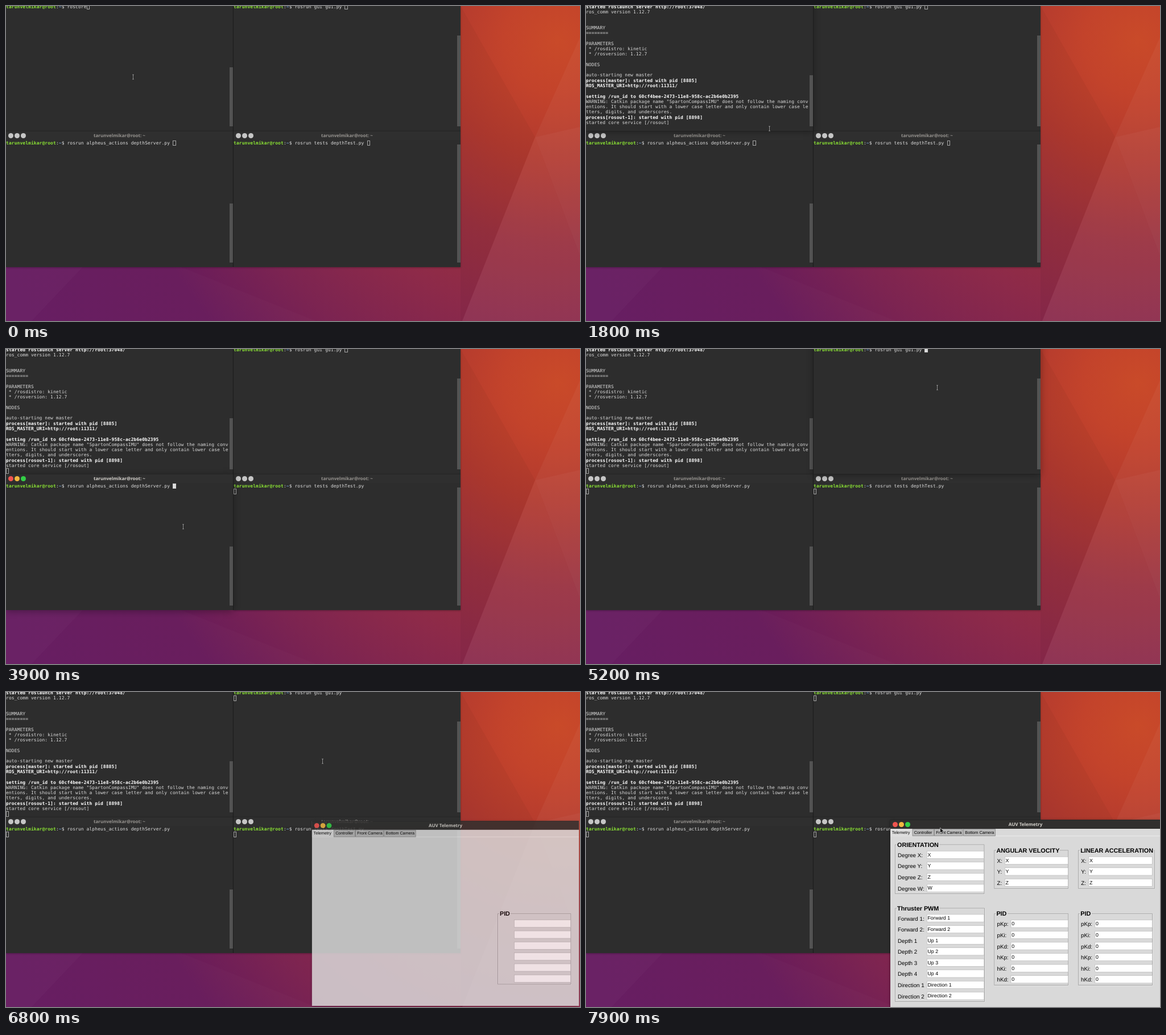
Write an HTML page that moves like this. It is 1009 px wide and 555 px high and loops after 8000 ms.

```html
<!DOCTYPE html>
<html lang="en">
<head>
<meta charset="utf-8">
<title>Terminals and telemetry</title>
<style>
  html, body { margin: 0; width: 100%; height: 100%; overflow: hidden; }
  body { position: relative; background: #6a1f5e; text-rendering: geometricPrecision; }
  svg { position: absolute; display: block; }
  #wall { left: 0; top: 0; }

  .win {
    position: absolute; width: 399px; height: 240px;
    background: #2d2d2d; box-shadow: 0 1px 3px rgba(0, 0, 0, .3);
  }
  .win.active { z-index: 2; box-shadow: 0 2px 12px rgba(0, 0, 0, .32); }
  .bar {
    position: absolute; left: 0; right: 0; top: 0; height: 16px;
    background: #2f2f2f; border-top: 1px solid #272727; box-sizing: border-box;
    text-align: center; color: #96938f; font: bold 8px/16px "Open Sans", sans-serif;
  }
  .active > .bar { color: #d6d3ce; }
  .dot { position: absolute; top: 3px; width: 9px; height: 9px; border-radius: 50%; background: #c6c6c6; }
  .dot:nth-of-type(1) { left: 4px; }
  .dot:nth-of-type(2) { left: 15px; }
  .dot:nth-of-type(3) { left: 26px; }
  .active .dot:nth-of-type(1) { background: #f0544f; }
  .active .dot:nth-of-type(2) { background: #f2b840; }
  .active .dot:nth-of-type(3) { background: #33cf46; }

  /* the tiny rotation keeps baselines from snapping to whole pixels */
  .rows {
    position: absolute; left: 0; top: 17px; margin: 0; color: #dcdcdc;
    font: 7.96px/9.27px "DejaVu Sans Mono", monospace; letter-spacing: .094px; white-space: pre;
    transform: rotate(.01deg); transform-origin: 0 0;
  }
  .rows b { color: #fff; }
  .rows .user { color: #8ae234; }
  .rows .dir { color: #729fcf; }
  .cursor {
    position: absolute; width: 5.4px; height: 9.4px; box-sizing: border-box;
    border: 1px solid #a6a6a6;
  }
  .cursor.solid { background: #dcdcdc; border-color: #d0d0d0; }
  .thumb { position: absolute; left: 393px; width: 6px; bottom: 8px; background: #535353; }

  #gui {
    position: absolute; z-index: 3; left: 535px; top: 225px; width: 475px; height: 330px;
    background: #d9d9d9; box-shadow: 0 1px 5px rgba(0, 0, 0, .4);
  }
  #gui .bar { background: #302f2e; color: #d3d0ca; font-size: 8.1px; }
  #gui svg { left: 0; top: 0; }
  #gui text { font-family: "Liberation Sans", Arial, sans-serif; }
  #gui.opening { opacity: .85; transform: scale(.988); transform-origin: 50% 163px; }
  .opening .late { display: none; }
  .head { font-weight: bold; font-size: 10.8px; stroke: #d9d9d9; stroke-width: 4px; paint-order: stroke; }
  .label { font-size: 9.75px; }
  .value { font-size: 8.8px; }
  .tab { font-size: 7.3px; }
  .mouse { z-index: 4; left: 0; top: 0; overflow: visible; }
</style>
</head>
<body>
<svg id="wall" width="1009" height="555">
  <defs>
    <radialGradient id="sky" gradientUnits="userSpaceOnUse" cx="970" cy="60" r="1050">
      <stop offset="0" stop-color="#c94a29"/>
      <stop offset=".09" stop-color="#c3432b"/>
      <stop offset=".2" stop-color="#b1392f"/>
      <stop offset=".34" stop-color="#98303e"/>
      <stop offset=".46" stop-color="#8d2a49"/>
      <stop offset=".6" stop-color="#7c2451"/>
      <stop offset=".75" stop-color="#671b5b"/>
      <stop offset="1" stop-color="#651b60"/>
    </radialGradient>
  </defs>
  <path fill="url(#sky)" d="M0 0H1009V555H0Z"/>
  <g fill="#fff">
    <path opacity=".04" d="M1009 55L930 231L1009 213Z"/>
    <path opacity=".07" d="M930 231L1009 213V440Z"/>
    <path opacity=".055" d="M930 231L1009 440V555H802Z"/>
    <path opacity=".03" d="M0 460H135L45 555H0Z"/>
    <path opacity=".01" d="M308 460L545 555H45L135 460Z"/>
  </g>
  <path opacity=".04" d="M799 0L930 231L802 555H799Z"/>
  <path fill="#262626" d="M398 0h3v460h-3z"/>
</svg>

<svg class="mouse" id="beam" width="6" height="10">
  <path d="M-1.6 -4H1.6M-1.6 4H1.6M0 -4V4" fill="none" stroke="#1c1c1c" stroke-width="1.6"/>
  <path d="M-1.5 -4H1.5M-1.5 4H1.5M0 -4V4" fill="none" stroke="#c8c8c8" stroke-width=".7"/>
</svg>
<svg class="mouse" id="arrow" width="8" height="12">
  <path d="M0 0V9.4L2.2 7.4L3.8 10.8L5.2 10.2L3.8 6.8H6.6Z" fill="#111" stroke="#e8e8e8" stroke-width=".6"/>
</svg>

<script>
const LOOP = 8000, STEP = 100, BLINK = 600, CELL_W = 4.886, CELL_H = 9.27;
const USER = "tarunvelmikar";
const PROMPT_LEN = USER.length + 9;
const RUN_ID = "60cf4bee-2473-11e8-958c-ac2b6e0b2395";
const $ = id => document.getElementById(id);

const prompt = cmd => `<b class="user">${USER}@root</b>:<b class="dir">~</b>$ ${cmd}`;
const wrap = s => s.match(/.{1,80}/g);
const LOG = [
  ...wrap(`... logging to /home/${USER}/.ros/log/${RUN_ID}/roslaunch-root-8874.log`),
  "Checking log directory for disk usage. This may take awhile.",
  "Press Ctrl-C to interrupt",
  "Done checking log file disk usage. Usage is &lt;1GB.",
  "",
  "started roslaunch server http://root:37048/",
  "ros_comm version 1.12.7",
  "", "",
  "SUMMARY",
  "========",
  "",
  "PARAMETERS",
  " * /rosdistro: kinetic",
  " * /rosversion: 1.12.7",
  "",
  "NODES",
  "",
  "auto-starting new master",
  "process[master]: started with pid [8885]",
  "ROS_MASTER_URI=http://root:11311/",
  "",
  `setting /run_id to ${RUN_ID}`,
  ...wrap('WARNING: Catkin package name "SpartonCompassIMU" does not follow the naming conventions. ' +
    "It should start with a lower case letter and only contain lower case letters, digits, and underscores."),
  "process[rosout-1]: started with pid [8898]",
  "started core service [/rosout]"
].map(s => /^(started ros|process|ROS_|setting)/.test(s) ? `<b>${s}</b>` : s);

// log: [time, lines printed, lines scrolled away]
const WINS = [
  { x: 0, y: -20, cmd: "roscore", thumb: 128, focus: 400, enter: 1200,
    log: [[1400, 5, 0], [1500, 21, 0], [1800, 29, 7]] },
  { x: 400, y: -20, cmd: "rosrun gui gui.py ", thumb: 72, focus: 5200, enter: 5600 },
  { x: 0, y: 220, cmd: "rosrun alpheus_actions depthServer.py ", thumb: 128, focus: 3800, enter: 4400 },
  { x: 400, y: 220, cmd: "rosrun tests depthTest.py ", thumb: 24, focus: 2300, enter: 3000 }
];
const GUI_OPEN = 6800, GUI_READY = 6900, ARROW_FROM = 7300;

// [time, x, y]; a time alone hides the pointer
const PATH = [
  [0, 223, 125], [1200],
  [1800, 322, 216], [2200, 560, 284], [3000],
  [3300, 500, 298], [3700, 311, 313], [4400],
  [4800, 380, 235], [5000, 617, 68], [5700],
  [6400, 612, 76], [6700, 559, 121], [6800, 556, 122], [6900, 556, 122],
  [7200, 695, 206], [7300, 736, 219], [7400, 736, 219], [7900, 622, 239]
];

const bar = title => `<div class="bar"><i class="dot"></i><i class="dot"></i><i class="dot"></i>${title}</div>`;

function addBox(cls, html) {
  const el = document.createElement("div");
  el.className = cls;
  el.innerHTML = html;
  document.body.append(el);
  return el;
}

for (const w of WINS) {
  w.el = addBox("win", bar(`${USER}@root: ~`) +
    '<pre class="rows"></pre><div class="cursor"></div><div class="thumb"></div>');
  w.el.style.left = w.x + "px";
  w.el.style.top = w.y + "px";
  [w.rows, w.cursor, w.bar] = [".rows", ".cursor", ".thumb"].map(s => w.el.querySelector(s));
}

const text = (cls, x, mid, s, size) => `<text class="${cls}" x="${x}" y="${mid + size * .35}">${s}</text>`;

function group(title, x, y, w, h, labelX, entryX, entryW, firstY, fields, early) {
  const late = early ? "" : "late";
  let out = `<g class="${late}"><path d="M${x + .6} ${y + .6}h${w}v${h}h${-w}z" fill="none" stroke="#f4f4f4" stroke-width=".7"/>
    <path d="M${x} ${y}h${w}v${h}h${-w}z" fill="none" stroke="#969696" stroke-width=".8"/>` +
    text("head", x + 3.6, y, title, 10.8);
  fields.forEach(([label, value], i) => {
    const mid = firstY + i * 19.57;
    out += `<rect x="${entryX}" y="${mid - 6.8}" width="${entryW}" height="13.2" fill="#fff" stroke="#b4b4b4" stroke-width=".6"/>
      <g class="late">${text("label", labelX, mid + .4, label, 9.75)}${text("value", entryX + 1.2, mid - .3, value, 8.8)}</g>`;
  });
  return out + "</g>";
}

const axes = s => [...s].map(c => [c + ":", c]);
const gains = ["pKp:", "pKi:", "pKd:", "hKp:", "hKi:", "hKd:"].map(s => [s, "0"]);
const thrusters = [
  ...[1, 2].map(n => [`Forward ${n}:`, `Forward ${n}`]),
  ...[1, 2, 3, 4].map(n => [`Depth ${n}`, `Up ${n}`]),
  ...[1, 2].map(n => [`Direction ${n}`, `Direction ${n}`])
];
const tabs = [["Telemetry", 535, 38], ["Controller", 574, 37.5], ["Front Camera", 612.5, 49.5], ["Bottom Camera", 663.5, 56]]
  .map(([name, x, w], i) =>
    `<rect x="${x}" y="241.5" width="${w}" height="12" fill="${i ? "#b9b9b9" : "#dedede"}" stroke="${i ? "#858585" : "#dedede"}" stroke-width=".8"/>` +
    text("tab", x + 2.8, 247, name, 7.3)).join("");

const gui = addBox("active", bar("AUV Telemetry") +
  `<svg width="475" height="330" viewBox="535 225 475 330">
    <path d="M535 253.7H1010" stroke="#f0f0f0" stroke-width=".8"/>${tabs}` +
  group("ORIENTATION", 543.5, 269, 156.5, 86.5, 548, 599.3, 100, 287, axes("XYZW").map(([l, v]) => ["Degree " + l, v])) +
  group("ANGULAR VELOCITY", 717.8, 279, 130, 67.3, 722.5, 736.3, 111, 297, axes("XYZ")) +
  group("LINEAR ACCELERATION", 865.6, 279, 134, 67.3, 870.3, 883.7, 111.5, 297, axes("XYZ")) +
  group("Thruster PWM", 543.5, 381, 157, 164.5, 548, 599.3, 100.5, 398.7, thrusters) +
  group("PID", 717.8, 390.7, 130, 125.8, 722.5, 747, 100.5, 408.6, gains) +
  group("PID", 865.6, 390.7, 130, 125.8, 870, 894.8, 100.5, 408.6, gains, true) +
  "</svg>");
gui.id = "gui";

function drawWindow(w, t, active) {
  const entered = t >= w.enter;
  const [, shown, scroll] = (w.log || []).filter(s => t >= s[0]).pop() || [0, 0, 0];
  const lines = [prompt(w.cmd), ...LOG.slice(0, shown)].slice(scroll);
  w.rows.innerHTML = lines.join("\n");
  w.el.classList.toggle("active", active);

  const row = entered ? lines.length : 0;
  const col = entered ? 0 : PROMPT_LEN + w.cmd.length;
  const since = t - (entered ? w.enter : w.focus);
  const lit = !active || Math.floor(since / BLINK) % 2 === 0;
  w.cursor.classList.toggle("solid", active);
  Object.assign(w.cursor.style, {
    left: col * CELL_W + "px",
    top: 17 + row * CELL_H + "px",
    visibility: lit ? "visible" : "hidden"
  });
  w.bar.style.top = w.thumb + (scroll ? 14 : 0) + "px";
}

function drawMouse(t) {
  const i = PATH.findLastIndex(p => t >= p[0]);
  const [t0, x0, y0] = PATH[i];
  const [t1, x1 = x0, y1 = y0] = PATH[i + 1] || [LOOP];
  const k = (t - t0) / (t1 - t0);
  const overGui = t >= ARROW_FROM;
  for (const [id, on] of [["beam", !overGui], ["arrow", overGui]]) {
    const s = $(id).style;
    s.display = on && x0 !== undefined ? "block" : "none";
    if (x0 !== undefined) s.transform = `translate(${x0 + (x1 - x0) * k + .5}px, ${y0 + (y1 - y0) * k}px)`;
  }
}

function draw(t) {
  const focused = WINS.filter(w => t >= w.focus).sort((a, b) => b.focus - a.focus)[0];
  for (const w of WINS) drawWindow(w, t, w === focused && t < GUI_OPEN);
  gui.style.display = t >= GUI_OPEN ? "block" : "none";
  gui.classList.toggle("opening", t < GUI_READY);
  drawMouse(t);
}

let last = -1;
function tick() {
  const t = Math.floor(performance.now() % LOOP / STEP) * STEP;
  if (t !== last) draw(last = t);
  requestAnimationFrame(tick);
}
tick();
</script>
</body>
</html>
```
